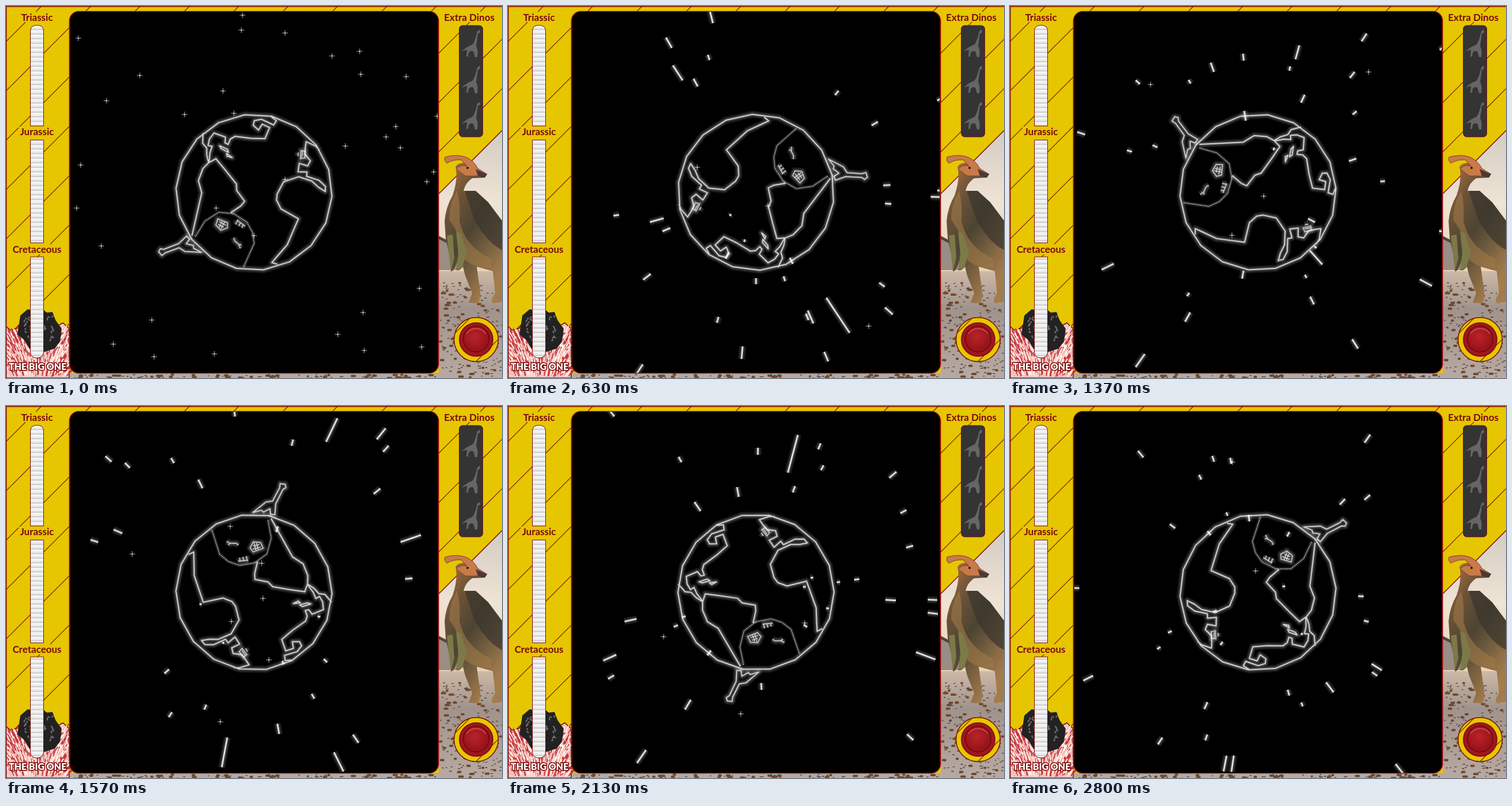
Recreate the animation shown at these times as an HTML page with a canvas. Size 864x648 px, loop 2830 ms.

```html
<!DOCTYPE html>
<html>
<head>
<meta charset="utf-8">
<style>
html, body { margin: 0; width: 100%; height: 100%; overflow: hidden; background: #e6c600; }
svg, canvas { position: absolute; left: 0; top: 0; width: 864px; height: 648px; }
canvas { clip-path: inset(10px 112px 9px 112px round 15px); }
text { font: 700 17px Lato, Inter, sans-serif; fill: #7c0a0a; text-anchor: middle; }
</style>
</head>
<body>
<svg viewBox="0 0 864 648">
  <defs>
    <pattern id="stripes" width="86" height="86" patternUnits="userSpaceOnUse">
      <rect width="86" height="86" fill="#e6c600"/>
      <path d="M-1 63L63 -1M61 87L87 61" stroke="#7c0a0a" stroke-width="1.2"/>
    </pattern>
    <linearGradient id="ribs" gradientUnits="userSpaceOnUse" x1="0" y1="2" x2="0" y2="10" spreadMethod="repeat">
      <stop offset="0" stop-color="#fafafa"/><stop offset=".6" stop-color="#ececec"/><stop offset="1" stop-color="#c2c2c2"/>
    </linearGradient>
    <linearGradient id="sky" x2="0" y2="1">
      <stop offset="0" stop-color="#d3ccc4"/><stop offset=".5" stop-color="#efe3d3"/><stop offset="1" stop-color="#e9d0b4"/>
    </linearGradient>
    <linearGradient id="ground" x2="0" y2="1">
      <stop offset="0" stop-color="#cdb9a6"/><stop offset=".35" stop-color="#a0938c"/><stop offset="1" stop-color="#b8aaa2"/>
    </linearGradient>
    <linearGradient id="skin" x2=".6" y2="1">
      <stop offset="0" stop-color="#b9743f"/><stop offset=".3" stop-color="#6b5237"/>
      <stop offset=".55" stop-color="#4c4433"/><stop offset="1" stop-color="#a47c4c"/>
    </linearGradient>
    <radialGradient id="knob" cx=".45" cy=".4">
      <stop offset="0" stop-color="#b8242a"/><stop offset="1" stop-color="#9a141a"/>
    </radialGradient>
    <path id="sauropod" d="M825 41L826 46L822 48L819 70Q823 76 821 89H817L814 79Q809 77 806 81L805 88H802L803 76L794 79Q802 71 811 68Q816 66 821 44Z" fill="#666"/>
  </defs>

  <rect width="864" height="648" fill="url(#stripes)"/>
  <path d="M754 326L864 217V470H754Z" fill="url(#sky)"/>
  <path d="M754 400L778 413L790 460H754Z" fill="#9a8d86"/>
  <path d="M754 462H864V648H110V639H754Z" fill="url(#ground)"/>
  <path id="pebbles" stroke="#70492c" stroke-width="4" stroke-linecap="round"/>
  <path id="grit" stroke="#554b46" stroke-width="1.6" stroke-linecap="round"/>
  <path d="M754 327L864 217" stroke="#7c0a0a" stroke-width="1.5"/>

  <path d="M754 401L774 411V416L754 406Z" fill="#4c4640"/>
  <path d="M783 280Q790 270 806 275L818 282L838 293L834 299L812 300Q800 308 797 322L818 322L840 342L864 374V515L849 518Q842 514 852 500L848 462L820 454L826 498Q827 512 822 518L806 517L812 500L800 470L796 454Q790 462 784 460L788 440Q780 464 775 462L774 440L766 405L764 375Q766 350 778 330Q788 300 783 280Z" fill="url(#skin)"/>
  <path d="M772 372Q772 345 786 322Q792 345 790 375Q800 420 845 440L846 456Q815 458 798 440L790 400Z" fill="#a07a49" opacity=".6"/>
  <path d="M799 322L818 322L840 342L864 374V425Q835 410 815 370Z" fill="#39362d" opacity=".7"/>
  <path d="M784 392L792 396L803 428L795 456L784 460L788 432ZM768 400L778 398L781 438L775 462Z" fill="#7c7a48"/>
  <path d="M784 284Q792 275 803 279L793 268Q778 267 768 274Q762 268 765 263Q786 257 803 264Q816 271 822 283L838 293L830 296L800 296Z" fill="#c97a48" stroke="#7b4128"/>
  <path d="M818 284L838 293L834 299L822 296Z" fill="#493a35"/>
  <circle cx="804" cy="282" r="2" fill="#241812"/>

  <path d="M0 558L8 565L20 561L30 545L80 535L90 557L99 552L110 562V648H0Z" fill="#f3c3ba" stroke="#7c0a0a" stroke-width="1.5"/>
  <path id="flame1" stroke="#c5343f" stroke-width="1.8"/>
  <path id="flame2" stroke="#fff0e8" stroke-width="1.6"/>
  <path d="M20 572L25 539L38 528L50 532L61 526L71 534L81 533L86 547L97 562L94 585L84 597L62 604L40 596L32 582Z" fill="#222"/>
  <path id="rock" stroke="#707070" stroke-width="2.2"/>

  <g fill="url(#ribs)" stroke="#7c0a0a">
    <path d="M42.5 209V43Q43 33.500 54 33.500T65.500 43V209Z"/>
    <path d="M42.500 233.500H65.500V412.500H42.500Z"/>
    <path d="M42.500 437V603Q43 613 54 613T65.500 603V437Z"/>
  </g>
  <g>
    <rect x="24" y="10" width="60" height="18" fill="#e6c600"/>
    <rect x="22" y="210" width="64" height="18" fill="#e6c600"/>
    <rect x="7" y="415" width="94" height="18" fill="#e6c600"/>
    <rect x="760" y="10" width="94" height="18" fill="#e6c600"/>
    <text x="54" y="26">Triassic</text>
    <text x="54" y="225">Jurassic</text>
    <text x="54" y="430">Cretaceous</text>
    <text x="807" y="26">Extra Dinos</text>
    <text x="55" y="634" style="font-weight:900;font-size:16px;fill:#fff;stroke:#7c0a0a;stroke-width:3px;paint-order:stroke">THE BIG ONE</text>
  </g>

  <rect x="789.5" y="34" width="41" height="194" rx="6" fill="#343434" stroke="#7c0a0a"/>
  <use href="#sauropod"/><use href="#sauropod" y="63"/><use href="#sauropod" y="126"/>

  <circle cx="819" cy="581" r="38.500" fill="url(#stripes)" stroke="#7c0a0a" stroke-width="1.5"/>
  <circle cx="819" cy="581" r="29" fill="#a3161d" stroke="#801016" stroke-width="2"/>
  <circle cx="819" cy="580" r="22.500" fill="url(#knob)" stroke="#6e0d12" stroke-width="2"/>
  <path d="M802 571Q808 562 819 562T836 571" fill="none" stroke="#d0565a" stroke-width="1.5"/>

  <path d="M.5 648V1H864" fill="none" stroke="#7c0a0a" stroke-width="1.500"/>
  <rect x="111" y="10" width="642" height="629" rx="16" stroke="#850c0c" stroke-width="2.500"/>
</svg>
<canvas width="864" height="648"></canvas>

<script>
const LOOP = 2830, STEPS = 71, CX = 432, CY = 324.5, TURN = 12.77;
const ctx = document.querySelector('canvas').getContext('2d');

let seed = 7;
const rnd = (a, b) => {
  seed = (seed * 16807) % 2147483647;
  return a + (b - a) * seed / 2147483647;
};

// Textures: many short dashes gathered in one path each
function scatter(id, count, dash) {
  let d = '';
  for (let i = 0; i < count; i++) d += dash();
  document.getElementById(id).setAttribute('d', d);
}
const mark = (x, y, dx, dy) => `M${x.toFixed(1)} ${y.toFixed(1)}l${dx.toFixed(1)} ${dy.toFixed(1)}`;
const floor = w => rnd(0, 1) < .72
  ? mark(rnd(756, 864), rnd(482, 648), rnd(1, w), 0)
  : mark(rnd(112, 754), rnd(642, 648), rnd(1, w), 0);
const flame = () => {
  const x = rnd(2, 108), y = rnd(568, 646), len = rnd(4, 13);
  return mark(x, y, (x - 55) / 55 * len * .7, -len);
};
scatter('pebbles', 95, () => floor(6));
scatter('grit', 230, () => floor(3));
scatter('flame1', 330, flame);
scatter('flame2', 260, flame);
scatter('rock', 45, () => mark(rnd(32, 84), rnd(538, 588), rnd(-4, 5), rnd(1, 5)));

// Starfield: a perspective flight, computed once for every step
const firstStars = [
  412,16, 410,42, 486,47, 126,56, 568,87, 616,79, 618,119, 697,123, 233,121, 175,165,
  378,148, 311,189, 397,187, 679,210, 662,228, 591,244, 687,247, 745,289, 733,306, 130,277,
  123,352, 166,418, 486,302, 366,352, 432,400, 720,492, 622,534, 578,572, 624,600, 724,594,
  254,547, 187,589, 258,611, 363,606, 751,192
];
const stars = [];
for (let i = 0; i < firstStars.length; i += 2) {
  const x = firstStars[i] - CX, y = firstStars[i + 1] - CY;
  stars.push({ x, y, px: x, py: y, z: rnd(12, 32) });
}
function fly(s) {
  s.px = s.x;
  s.py = s.y;
  const k = s.z / (s.z - 1);
  s.x *= k;
  s.y *= k;
  s.z--;
  if (s.z < 3 || Math.abs(s.px) > 322 || Math.abs(s.py) > 316) {
    s.x = s.px = rnd(-240, 240);
    s.y = s.py = rnd(-240, 240);
    s.z = rnd(15, 32);
  }
}
const sky = [];
for (let n = 0; n < STEPS; n++) {
  sky.push(stars.map(s => ({ ...s })));
  stars.forEach(fly);
}

// Globe, drawn at step 26 of its turn
let rim = '';
for (let a = 15; a < 375; a += 20) {
  const r = a * Math.PI / 180;
  rim += (rim ? 'L' : 'M') + (CX + 136 * Math.cos(r)) + ' ' + (CY + 136 * Math.sin(r));
}
const land = new Path2D(rim + 'Z' +
  // North and South America
  'M396 194L408 196L407 205L384 206L374 214L376 222L388 225L389 213L403 212L405 233L383 244L357 254L352 262L353 272L347 272L343 263L322 266L320 279L323 290L330 288L332 300L338 314' +
  'M305 275L313 291L323 295L329 306L338 316L346 304L368 313L398 326L404 336L425 346L423 356L413 375' +
  'M338 316L334 330L337 352L352 368L372 442' +
  'M341 281L356 280L360 284L346 284ZM358 287L370 289L361 291Z' +
  // Africa and Europe
  'M527 416L517 418L520 404L526 378L522 329L487 328L473 318L469 308L469 284L488 264L512 260L527 264L541 265L537 257L522 253L500 257L497 250L483 257L478 243L493 240L493 230L479 224L474 213L471 204L489 203L498 206');
const isles = new Path2D('M470 222L477 220L482 230L476 235ZM473 222L477 232M468 227L470 233');
const crater = new Path2D('M378 441L380 409L394 384L418 374L445 376L462 387L474 403L477 448');
const face = new Path2D('M398 395L416 393L420 401L412 410L400 406ZM402 398H416M403 403H414M407 395V407M411 394V408' +
  'M428 381L446 384M430 382V389M436 382V389M442 383V389M438 411L442 415L451 417L457 422M451 417L456 416');
const bone = new Path2D('M400 460L374 472L362 471L345 490L342 497L334 494L334 488L340 486L358 465L364 447L371 449L370 459L382 456L385 460Z');

function glow(path, core = 2, light = .75) {
  for (const [w, a] of [[13, .07], [9, .1], [5, .16], [core, light]]) {
    ctx.lineWidth = w;
    ctx.strokeStyle = `rgba(255,255,255,${a})`;
    ctx.stroke(path);
  }
}

function drawStar(s) {
  const still = Math.hypot(s.x - s.px, s.y - s.py) < 3;
  const p = new Path2D();
  if (still) {
    p.moveTo(s.x - 5, s.y); p.lineTo(s.x + 5, s.y);
    p.moveTo(s.x, s.y - 5); p.lineTo(s.x, s.y + 5);
    ctx.lineWidth = 3;
    ctx.strokeStyle = 'rgba(255,255,255,.12)';
    ctx.stroke(p);
    ctx.lineWidth = 1;
    ctx.strokeStyle = 'rgba(255,255,255,.45)';
    ctx.stroke(p);
    ctx.fillStyle = '#ddd';
    ctx.fillRect(s.x - 1, s.y - 1, 2, 2);
  } else {
    p.moveTo(s.px, s.py);
    p.lineTo(s.x, s.y);
    glow(p, 2.6, .85);
  }
}

function draw(n) {
  ctx.setTransform(1, 0, 0, 1, 0, 0);
  ctx.fillStyle = '#000';
  ctx.fillRect(0, 0, 864, 648);
  ctx.lineJoin = 'round';
  ctx.translate(CX, CY);
  sky[n].forEach(drawStar);

  ctx.rotate((n - 26) * TURN * Math.PI / 180);
  ctx.translate(-CX, -CY);
  glow(land);
  glow(bone, 1.8);
  glow(isles, 1.5);
  glow(face, 1.5);
  ctx.lineWidth = 6;
  ctx.strokeStyle = 'rgba(255,255,255,.13)';
  ctx.stroke(crater);
  ctx.setLineDash([2, 1]);
  ctx.lineWidth = 1.4;
  ctx.strokeStyle = '#c4c4c4';
  ctx.stroke(crater);
  ctx.setLineDash([]);
}

// The scene steps at 25 per second, seen through a 30 per second shutter
let start;
function tick(now) {
  start ??= now;
  const t = (now - start) % LOOP;
  const shot = Math.floor(.3 * Math.floor(t / 10) + .15);
  draw(Math.min(STEPS - 1, Math.floor((shot * 100 / 3 + 16) / 40)));
  requestAnimationFrame(tick);
}
draw(0);
requestAnimationFrame(tick);
</script>
</body>
</html>
```
